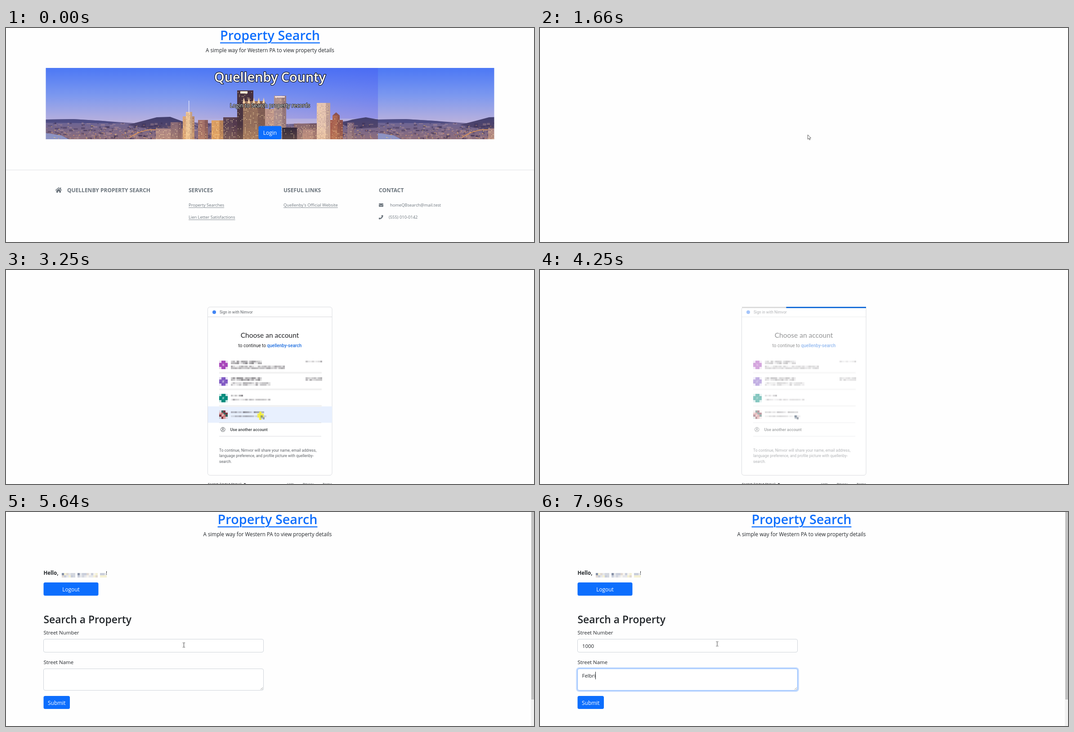
These frames come from a looping animation (1174 px wide and 477 px high, 8000 ms). An HTML page with a canvas:

```html
<!DOCTYPE html>
<html lang="en">
<head>
<meta charset="utf-8">
<title>Property Search</title>
<style>
html, body { margin: 0; width: 100%; height: 100%; overflow: hidden; background: #fefefe; }
canvas { display: block; }
</style>
</head>
<body>
<canvas id="stage" width="1174" height="477"></canvas>
<script>
const LOOP = 8000, W = 1174, H = 477;
const PAGE = '#fefefe', BLUE = '#0d6efd', INK = '#212529', MUTED = '#6c757d';
const SANS = '"Open Sans", "Noto Sans", sans-serif';
const ROBOTO = 'Roboto, sans-serif';
let c = document.getElementById('stage').getContext('2d');

const clamp = v => Math.max(0, Math.min(1, v));
const progress = (t, from, to) => clamp((t - from) / (to - from));
const ease = p => p * p * (3 - 2 * p);
const mix = (a, b, p) => a + (b - a) * p;
const mixColor = (a, b, p) => `rgb(${a.map((v, i) => Math.round(mix(v, b[i], p)))})`;

function random(seed) {
  return () => {
    seed = (seed * 1664525 + 1013904223) >>> 0;
    return seed / 4294967296;
  };
}

function rect(x, y, w, h, fill) {
  c.fillStyle = fill;
  c.fillRect(x, y, w, h);
}

function box(x, y, w, h, r, fill, stroke, line = 1) {
  c.beginPath();
  c.roundRect(x, y, w, h, r);
  if (fill) { c.fillStyle = fill; c.fill(); }
  if (stroke) { c.strokeStyle = stroke; c.lineWidth = line; c.stroke(); }
}

function polygon(points, fill, stroke, line = 1) {
  c.beginPath();
  points.forEach(([x, y]) => c.lineTo(x, y));
  c.closePath();
  if (fill) { c.fillStyle = fill; c.fill(); }
  if (stroke) { c.strokeStyle = stroke; c.lineWidth = line; c.stroke(); }
}

function text(str, x, y, size, color, o = {}) {
  c.font = `${o.weight || 400} ${size}px ${o.font || SANS}`;
  c.textAlign = o.align || 'left';
  c.lineJoin = 'round';
  const width = c.measureText(str).width;
  if (o.underline) {
    const left = o.align === 'center' ? x - width / 2 : x;
    rect(left, Math.round(y + o.underline * 2), width, o.underline, color);
  }
  if (o.outline || o.underline) {
    c.strokeStyle = o.outline || PAGE;
    c.lineWidth = o.line || 2.4;
    c.strokeText(str, x, y);
  }
  c.fillStyle = color;
  c.fillText(str, x, y);
  return width;
}

function verticalGradient(top, bottom, ...colors) {
  const g = c.createLinearGradient(0, top, 0, bottom);
  colors.forEach((color, i) => g.addColorStop(i / (colors.length - 1), color));
  return g;
}

// ---------- Skyline banner, painted once ----------
function paintSkyline() {
  const tile = document.createElement('canvas');
  tile.width = 739;
  tile.height = 159;
  const page = c, rnd = random(7);
  c = tile.getContext('2d');
  c.translate(-88, -89);

  rect(88, 89, 739, 159, verticalGradient(89, 212, '#4c78f5', '#7c98ef', '#bcb2dc'));
  const shade = c.createLinearGradient(400, 0, 827, 0);
  shade.addColorStop(0, 'rgba(70,75,240,0)');
  shade.addColorStop(1, 'rgba(70,75,240,.28)');
  rect(88, 89, 739, 113, shade);

  // Hazy town, then the dark wooded hills in front of it
  polygon([[88, 204], [150, 203], [215, 207], [285, 212], [345, 206], [430, 211], [560, 216],
    [690, 212], [745, 208], [827, 203], [827, 248], [88, 248]],
    verticalGradient(202, 248, '#66649c', '#776689', '#8f6f7c'));
  const dark = verticalGradient(197, 236, '#413f70', '#5b4968');
  polygon([[270, 216], [305, 207], [335, 199], [365, 198], [395, 209], [395, 227], [320, 226]], dark);
  polygon([[742, 212], [770, 204], [800, 199], [827, 204], [827, 222], [770, 225]], dark);
  polygon([[88, 204], [150, 203], [215, 207], [260, 212], [180, 212], [88, 211]], '#4d4c83');
  for (let i = 0; i < 420; i++) {
    const shadow = rnd() < .55;
    rect(88 + 739 * rnd(), 210 + 36 * rnd(), 3 + 7 * rnd(), 1.5 + 3 * rnd(),
      shadow ? 'rgba(50,38,75,.42)' : 'rgba(205,165,160,.32)');
  }
  polygon([[88, 234], [122, 239], [140, 248], [88, 248]], '#8c93c4');
  for (let i = 0; i < 420; i++) {
    const y = 212 + 34 * Math.sqrt(rnd());
    rect(88 + 739 * rnd(), y, 1 + 2 * rnd(), 1.4, `rgba(255,${150 + 75 * rnd() | 0},100,${.25 + .6 * rnd()})`);
  }
  c.beginPath();
  c.moveTo(275, 244);
  c.quadraticCurveTo(315, 218, 352, 231);
  c.strokeStyle = 'rgba(255,165,75,.7)';
  c.lineWidth = 1.6;
  c.stroke();

  const towers = [
    [333, 224, 61, '#a98487'], [366, 210, 24, '#8d6d77'], [393, 197, 26, '#dba678'],
    [400, 187, 14, '#edc598'], [427, 205, 22, '#a47068'], [457, 206, 26, '#dda063'],
    [483, 199, 32, '#5c4354'], [514, 139, 36, '#4a3441'], [573, 180, 40, '#c0978a'],
    [596, 151, 27, '#b0928f'], [527, 163, 49, '#96705c'], [640, 213, 52, '#8a6a72'],
    [614, 222, 33, '#292339'], [660, 226, 33, '#b08682'], [691, 167, 30, '#e6c4b0'],
    [721, 205, 28, '#a65d4e'], [726, 195, 16, '#ad6752'], [759, 211, 15, '#8b7186']
  ];
  for (const [x, y, w, color] of towers) {
    rect(x, y, w, 248 - y, color);
    rect(x + w * .68, y, w * .32, 248 - y, 'rgba(55,30,55,.22)');
    rect(x, 215, w, 33, verticalGradient(215, 248, 'rgba(255,190,110,0)', 'rgba(255,190,110,.22)'));
    for (let wy = y + 4; wy < 247; wy += 3) {
      for (let wx = x + 1; wx < x + w - 2; wx += 3) {
        const v = rnd();
        if (v > .5) rect(wx, wy, 2, 1.4, v > .82 ? 'rgba(255,228,170,.6)' : 'rgba(65,40,60,.2)');
      }
    }
  }
  rect(406, 162, 1.4, 27, '#dfe2fa');
  rect(521, 141, 16, 5, '#fff0d5');
  rect(598, 152, 22, 3, '#f7e3e0');
  for (let x = 529; x < 577; x += 11) polygon([[x - 3, 168], [x, 155], [x + 3, 168]], '#f3cfa3');
  polygon([[726, 195], [734, 188], [742, 195]], '#8c5350');
  c = page;
  return tile;
}
const skyline = paintSkyline();

// ---------- Pointers ----------
function arrow(x, y) {
  const shape = [[0, 0], [0, 10], [2.3, 7.9], [3.9, 11.4], [5.5, 10.7], [4, 7.3], [7, 7.2]];
  polygon(shape.map(([a, b]) => [x + a + .4, y + b]), '#fff', '#333', .8);
}

function hand(x, y) {
  const shape = [[-1, 0], [1, 0], [1.2, 4], [6, 5], [6.3, 9], [5, 12], [-1, 12], [-4, 8], [-3, 6.7], [-1, 8]];
  polygon(shape.map(([a, b]) => [x + a, y + b]), '#fff', '#222', .8);
}

function beam(x, y) {
  rect(x - .5, y - 4, 1, 9, '#444');
  for (const end of [y - 5, y + 5]) {
    rect(x - 2.5, end, 2, 1, '#444');
    rect(x + .5, end, 2, 1, '#444');
  }
}

// ---------- Landing page ----------
function header(center) {
  text('Property Search', center, 27, 28.8, BLUE, { weight: 600, align: 'center', underline: 2.3 });
  text('A simple way for Western PA to view property details', center, 54, 11.7, INK, { align: 'center' });
}

function footerIcons() {
  c.beginPath();
  c.moveTo(110, 362);
  c.lineTo(117, 356);
  c.lineTo(124, 362);
  c.strokeStyle = MUTED;
  c.lineWidth = 1.6;
  c.stroke();
  rect(120.3, 355.5, 2, 4, MUTED);
  polygon([[112, 362.5], [117, 358.3], [122, 362.5], [122, 367], [118.3, 367], [118.3, 364],
    [115.7, 364], [115.7, 367], [112, 367]], MUTED);
  box(829, 391, 10, 7.5, 1, MUTED);
  c.beginPath();
  c.moveTo(829, 393);
  c.lineTo(834, 396.3);
  c.lineTo(839, 393);
  c.strokeStyle = PAGE;
  c.lineWidth = .8;
  c.stroke();
  polygon([[835.5, 417], [838.6, 417.6], [838.2, 421], [835.4, 424.6], [832, 426.3], [829.3, 426.5],
    [828.7, 423.6], [831, 422.4], [832.4, 423.7], [835.6, 420.5], [834.4, 419.2]], MUTED);
}

function landing(t) {
  header(587);
  c.save();
  c.beginPath();
  c.rect(88.5, 89, 997, 159);
  c.clip();
  c.drawImage(skyline, 88, 89);
  c.drawImage(skyline, 827, 89);
  c.restore();
  const onPhoto = { align: 'center', outline: '#111' };
  text('Quellenby County', 587, 120, 28.8, '#fff', { ...onPhoto, weight: 600 });
  text('Login to Search property records', 587, 177, 11.7, '#fff', { ...onPhoto, line: 1.7 });

  const normal = [13, 110, 253], hover = [11, 94, 215], active = [10, 88, 202];
  const ring = progress(t, 900, 1120);
  if (ring) box(559.5, 216.5, 55, 33, 5, null, `rgba(49,132,253,${.5 * ring})`, 3.5);
  const fill = t < 930 ? mixColor(normal, hover, progress(t, 710, 860))
    : t < 1390 ? mixColor(hover, active, ring)
    : mixColor(active, hover, progress(t, 1370, 1520));
  box(561.5, 218.5, 51, 29.5, 3.5, fill);
  text('Login', 587, 238, 12, '#fff', { align: 'center' });

  rect(0, 316, W, 1, '#dfe2e5');
  const caps = { weight: 700 }, link = { underline: .8, line: 1 };
  text('QUELLENBY PROPERTY SEARCH', 136, 366, 12, MUTED, caps);
  text('SERVICES', 406, 366, 12, MUTED, caps);
  text('USEFUL LINKS', 617, 366, 12, MUTED, caps);
  text('CONTACT', 829, 366, 12, MUTED, caps);
  text('Property Searches', 406, 398, 9.35, MUTED, link);
  text('Lien Letter Satisfactions', 406, 425, 9.35, MUTED, link);
  text("Quellenby's Official Website", 617, 398, 9.35, MUTED, link);
  text('homeQBsearch@mail.test', 854, 398, 9.35, MUTED);
  text('(555) 010-0142', 851, 425, 9.35, MUTED);
  footerIcons();

  if (t >= 70) {
    const p = ease(progress(t, 0, 790));
    (p > .93 ? hand : arrow)(mix(1077, 595, p), mix(434, 237, p));
  }
}

// ---------- Account chooser ----------
// Blurred-out lines of text: whole-pixel cells in soft greys
function mosaic(x, y, w, rows, seed, strength = .5) {
  const rnd = random(seed * 7919);
  const count = Math.round(w / 4.65);
  for (let j = 0; j < rows; j++) {
    for (let i = 0; i < count; i++) {
      const left = Math.round(x + i * 4.65), right = Math.round(x + (i + 1) * 4.65);
      rect(left, y + j * 4, right - left, 4, `rgba(70,66,72,${strength * (.15 + .85 * rnd())})`);
    }
  }
}

function avatar(y, colors) {
  const edge = i => Math.round(i * 4.65);
  for (let i = 0; i < 16; i++) {
    const col = i % 4, row = i >> 2;
    const corner = (col === 0 || col === 3) && (row === 0 || row === 3);
    c.save();
    c.globalAlpha *= corner ? .22 : 1;
    rect(474 + edge(col), y + edge(row), edge(col + 1) - edge(col), edge(row + 1) - edge(row),
      colors[(i * 3 + row) % colors.length]);
    c.restore();
  }
  rect(481, y + 7, 4, 5, 'rgba(255,255,255,.4)');
}

function chooser(t) {
  const move = ease(progress(t, 2200, 2910));
  const x = mix(595, 566, move), y = mix(238, 322, move);
  const dim = progress(t, 3300, 3420);
  const R = { font: ROBOTO }, grey = '#5f6368';

  box(448.5, 82.5, 276.5, 375, 5, '#fff', '#dadce0');
  c.save();
  c.globalAlpha = 1 - .52 * dim;
  if (dim < .5) {
    const row = Math.floor((y - 193) / 37);
    rect(449, 193 + row * 37, 276, 36.5, '#e8f0fe');
  }
  rect(449, 104, 276, 1, '#d5d7da');
  c.beginPath();
  c.arc(463, 94, 4, 0, 7);
  c.fillStyle = '#4285f4';
  c.fill();
  text('Sign in with Nimvor', 475, 97, 8.6, grey, R);
  text('Choose an account', 586.5, 151, 15.5, '#202124', { font: 'Lato, sans-serif', align: 'center' });
  const lead = text('to continue to ', 516.5, 172, 10.05, '#202124', R);
  text('quellenby-search', 516.5 + lead, 172, 10.05, '#1f6fe0', { ...R, weight: 500 });

  const accounts = [
    [70, 122, 36, ['#ab47bc', '#a445b8']],
    [70, 89, 36, ['#7e57c2', '#8560c6']],
    [26, 89, 0, ['#00897b', '#0a8f80']],
    [74, 77, 0, ['#c96a6e', '#dc9a98', '#7b3341', '#39625c']]
  ];
  accounts.forEach(([name, mail, status, colors], i) => {
    const top = 202 + i * 37, rows = i < 2 ? 2 : 1;
    avatar(top, colors);
    mosaic(499.5, i < 2 ? top : top + 2, name, rows, i + 1, .58);
    mosaic(499.5, top + 11, mail, rows, i + 11, .42);
    if (status) mosaic(666, top, status, 1 + i, i + 21, .4);
    if (i < 3) rect(474, top + 25, 228, 4, '#f2f2f2');
  });
  rect(474, 340, 227, 1, '#dadce0');
  rect(474, 370, 227, 1, '#dadce0');

  c.strokeStyle = grey;
  c.lineWidth = 1;
  for (const [cy, r, a, b] of [[355.5, 4.8, 0, 7], [354, 1.6, 0, 7], [360, 3.3, 3.5, 5.9]]) {
    c.beginPath();
    c.arc(482.3, cy, r, a, b);
    c.stroke();
  }
  text('Use another account', 498.5, 358.5, 9, '#3c4043', { ...R, weight: 500 });
  text('To continue, Nimvor will share your name, email address,', 474, 405, 8.6, grey, R);
  text('language preference, and profile picture with quellenby-', 474, 417, 8.6, grey, R);
  text('search.', 474, 430, 8.6, grey, R);
  c.restore();

  text('English (United States)', 449, 479.5, 7.4, '#202124', R);
  polygon([[528.5, 475.5], [533.5, 475.5], [531, 478]], '#202124');
  text('Help', 625, 479.5, 7.4, '#3c4043', R);
  text('Privacy', 660, 479.5, 7.4, '#3c4043', R);
  text('Terms', 704, 479.5, 7.4, '#3c4043', R);

  if (t >= 3400) {
    const left = 276 * progress(t, 4000, 4704), right = 276 * progress(t, 3400, 4115);
    rect(449, 82, 276, 3, '#dcdcdc');
    rect(449 + left, 82, right - left, 3, '#1a6fd8');
  }
  if (t >= 3250 && t < 3450) {
    c.globalAlpha = 1 - progress(t, 3310, 3450);
    rect(559, 320, 14, 9, '#f1ec55');
    rect(563, 316, 5, 18, '#f3ee3c');
    c.globalAlpha = 1;
  }
  if (x > 578) arrow(x, y);
  else {
    const px = Math.round(x), py = Math.round(y);
    rect(px, py + 2, 5, 5, 'rgba(90,110,130,.6)');
    rect(px + 5, py + 6, 4, 5, 'rgba(90,100,115,.55)');
    rect(px, py + 7, 5, 3, 'rgba(170,180,190,.6)');
  }
}

// ---------- Search form ----------
function field(y, h, focus) {
  if (focus) box(82, y - 1, 492, h + 3, 5, null, `rgba(13,110,253,${.25 * focus})`, 3.5);
  box(83.5, y + .5, 489, h, 3.5, '#fff', mixColor([206, 212, 218], [134, 183, 254], focus));
}

function button(label, x, y, w, h) {
  box(x, y, w, h, 3.5, BLUE);
  text(label, x + w / 2, y + 19.5, 11.9, '#fff', { align: 'center' });
}

function suggestions() {
  c.save();
  c.shadowColor = 'rgba(0,0,0,.3)';
  c.shadowBlur = 3;
  c.shadowOffsetY = 1;
  box(144, 319, 44, 93, 2, '#fff');
  c.restore();
  polygon([[153, 319.5], [157, 315], [161, 319.5]], '#fff', '#e4e4e4', .6);
  rect(150, 319.5, 14, 2, '#fff');
  ['1000', '1155', '1000', '1001'].forEach((n, i) => text(n, 151.5, 335 + i * 22.2, 7.5, '#333'));
}

function blurredName() {
  const rnd = random(5), tints = ['#d3d7df', '#f5f1d4', '#e6e7eb', '#f6f3ee', '#e1d9d3', '#c9cedb'];
  for (let i = 0; i < 20; i++) {
    for (const y of [136, 141]) {
      const tint = tints[rnd() * 6 | 0];
      const dark = y === 136 && i % 7 === 0 && i < 8;
      if (i !== 6 && i !== 16) rect(124 + i * 5, y, 5, 5, dark ? '#8791a8' : tint);
    }
  }
}

const typed = (str, times, t) => str.slice(0, times.filter(at => t >= at).length);

function search(t) {
  header(581.5);
  rect(1167, 0, 7, H, '#f1f1f1');
  rect(1168, 0, 6, 418, '#c1c1c1');

  text('Hello,', 83.5, 140, 11.5, INK, { weight: 700 });
  blurredName();
  text('!', 222, 140, 11.5, INK);
  button('Logout', 83.5, 157, 122, 29.5);
  text('Search a Property', 83.5, 248, 22.9, INK, { weight: 600 });
  text('Street Number', 83.5, 273, 11.45, INK);
  text('Street Name', 83.5, 339, 11.45, INK);

  const next = progress(t, 7040, 7230);
  field(283, 29, progress(t, 5820, 6040) * (1 - next));
  field(349, 48, next);
  c.beginPath();
  c.moveTo(566, 396);
  c.lineTo(571, 391);
  c.moveTo(569, 396);
  c.lineTo(571, 394);
  c.strokeStyle = '#888';
  c.lineWidth = .8;
  c.stroke();
  button('Submit', 83.5, 410, 58.5, 29);

  const number = typed('1000', [6510, 6570, 6770, 6900], t);
  const street = typed('Felbri', [7370, 7570, 7670, 7770, 7860, 7960], t);
  const numberWidth = text(number, 94, 303, 11.45, INK);
  const streetWidth = text(street, 93.5, 369, 11.45, INK);
  if (t >= 7040) rect(Math.round(93.5 + streetWidth), 356, 1, 17, INK);
  else if (t >= 5910 && (t < 6310 || t >= 6510)) rect(Math.round(93.5 + numberWidth), 290, 1, 17, INK);
  if (t >= 6510 && t < 6570) suggestions();

  if (t >= 5040) {
    const p = ease(progress(t, 5000, 5640)), settle = progress(t, 5640, 5840);
    const x = mix(470, 395.5, p) - 1.5 * settle, y = mix(446, 296, p) - 2.5 * settle;
    (y < 313 || (y > 349 && y < 397) ? beam : arrow)(x, y);
  }
}

function draw() {
  const t = performance.now() % LOOP;
  rect(0, 0, W, H, PAGE);
  if (t < 1660) landing(t);
  else if (t < 1860) arrow(595, 238);
  else if (t < 4320) chooser(t);
  else if (t >= 4390) search(t);
  requestAnimationFrame(draw);
}
draw();
</script>
</body>
</html>
```
